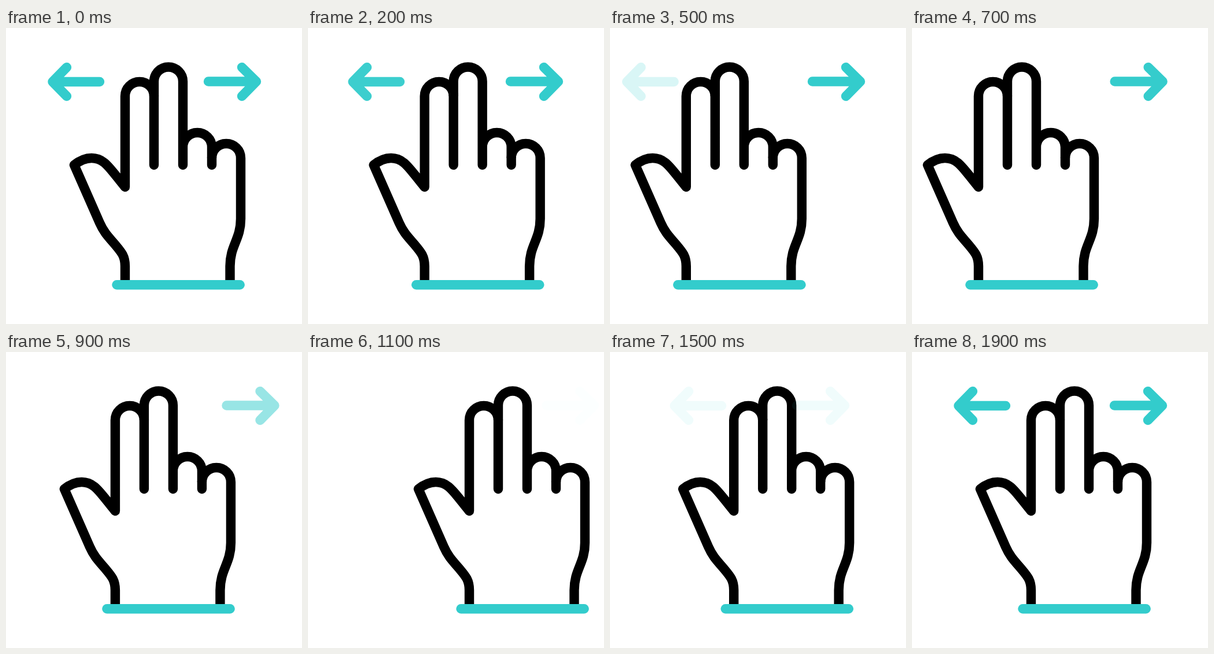
An HTML page that plays this animation: 512 px wide and 512 px high, repeating every 2 s.

```html
<!DOCTYPE html>
<html lang="en">
<head>
<meta charset="utf-8">
<title>Two-finger swipe</title>
<style>
  html, body { margin: 0; width: 100%; height: 100%; overflow: hidden; background: #fff; }
  svg { display: block; width: 100%; height: 100%; }
  path { fill: none; stroke-width: 16.4; stroke-linecap: round; stroke-linejoin: round; }
  .ink { stroke: #000; }
  .wrist { stroke-linecap: butt; }
  .teal { stroke: #33cccc; }
</style>
</head>
<body>
<svg viewBox="0 0 512 512">
  <g id="hand">
    <path class="ink wrist" d="M206 438V412C206 395 200 388 189 375C178 362 170 355 162 337L118 237Q133 225 148 225C170 225 178 241 206 275V118A25 25 0 0 1 256 118"/>
    <path class="ink" d="M256 237V92.5A25 25 0 0 1 306 92.5V237M306 206A25 25 0 0 1 356 206V237"/>
    <path class="ink wrist" d="M356 225A25 25 0 0 1 406 225V330C406 366 387.5 376 387.5 412V438"/>
    <path class="teal" d="M191.5 444.2H404.7"/>
  </g>
  <path id="left" class="teal" d="M162 93H80.5M105 68L80.5 93L105 118"/>
  <path id="right" class="teal" d="M350 92.5H433M408 68L433 92.5L408 118"/>
</svg>
<script>
  const LOOP = 2000, STEP = 100, SLACK = 8;
  const [hand, left, right] = ['hand', 'left', 'right'].map(id => document.getElementById(id));

  // Sine ease from 0 to 1 between two times
  function ease(t, start, end) {
    const p = Math.min(1, Math.max(0, (t - start) / (end - start)));
    return (1 - Math.cos(Math.PI * p)) / 2;
  }

  function place(el, x, alpha = 1) {
    el.setAttribute('transform', `translate(${x.toFixed(2)} 0)`);
    el.setAttribute('opacity', alpha.toFixed(3));
  }

  // An arrow drifts outward while fading, then slides back in from the inner side
  function arrow(el, t, out, back, inset) {
    const enter = ease(t, 1440, 1790);
    if (enter > 0) place(el, inset * (1 - enter), enter);
    else place(el, back * out, 1 - out);
  }

  function draw(t) {
    place(hand, -91 * ease(t, 127, 647) + 166 * ease(t, 700, 1130) - 75 * ease(t, 1170, 1590));
    arrow(left, t, ease(t, 127, 647), -63, 33.5);
    arrow(right, t, ease(t, 670, 1130), 63, -29);
  }

  // The motion advances ten times a second
  function tick() {
    const t = (performance.now() + SLACK) % LOOP;
    draw(Math.floor(t / STEP) * STEP);
    requestAnimationFrame(tick);
  }
  tick();
</script>
</body>
</html>
```
